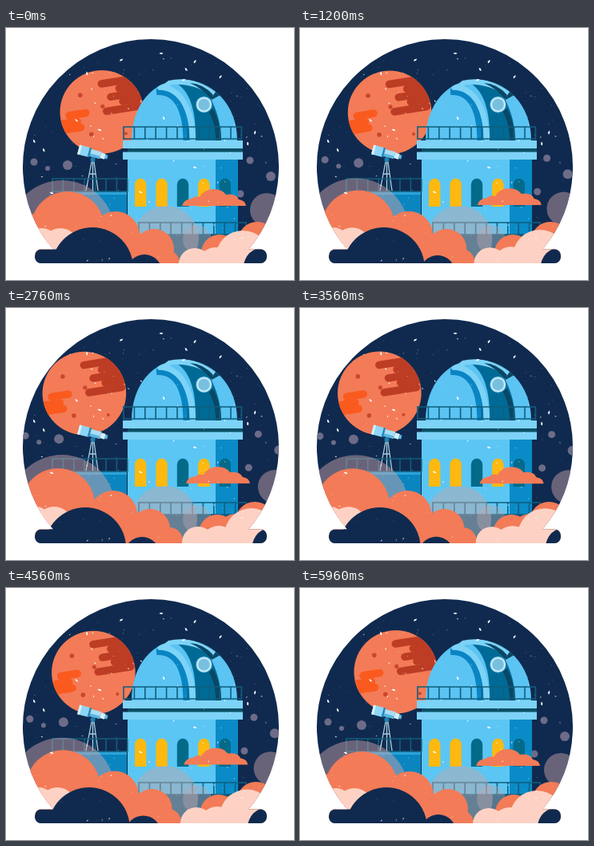
Write an HTML page that moves like this. It is 360x316 px and loops after 6000 ms.

```html
<!DOCTYPE html>
<html lang="en">
<head>
<meta charset="utf-8">
<title>Observatory</title>
<style>
html, body { margin: 0; width: 100%; height: 100%; overflow: hidden; background: #fff; }
svg { display: block; width: 360px; height: 316px; }
</style>
</head>
<body>
<svg id="scene" viewBox="0 0 360 316">
  <defs>
    <clipPath id="globe">
      <path d="M76.3 295A160 160 0 1 1 285.7 295Z"/>
      <rect x="36" y="277.5" width="290" height="17.5" rx="8"/>
    </clipPath>
    <clipPath id="disc"><circle r="52.3"/></clipPath>
    <clipPath id="domeClip"><path d="M157 141C157 96 184 65 221 65S289 96 289 141Z"/></clipPath>
  </defs>
  <g clip-path="url(#globe)">
    <rect width="360" height="316" fill="#102a4f"/>
    <g id="dots"></g>
    <g id="planet">
      <g clip-path="url(#disc)">
        <circle r="53" fill="#f37b57"/>
        <g id="bands" stroke-width="9.5" stroke-linecap="round" fill="none"></g>
        <g fill="#c9472e">
          <circle cx="-27" cy="-21" r="2.8"/><circle cx="1" cy="-7" r="2.6"/>
          <circle cx="-13" cy="28" r="2.8"/><circle cx="30" cy="27" r="2"/>
        </g>
      </g>
    </g>

    <rect x="72" y="205" width="79" height="60" fill="#0a85bf"/>
    <rect x="72" y="205" width="79" height="4" fill="#2ba3d8"/>
    <g id="scope" stroke-linecap="round">
      <path d="M107 168L100 204M108.5 168V204M110 168L115 204M104 183H112" stroke="#a9cfe2" stroke-width="1.3" fill="none"/>
      <g transform="translate(108 157) rotate(15)">
        <rect x="-18" y="-6" width="14" height="12" rx="1" fill="#8fd6f6"/>
        <rect x="-18" y="-6" width="3" height="12" fill="#d8f1fb"/>
        <rect x="-5" y="-6" width="2.5" height="12" fill="#2088bd"/>
        <rect x="-2.5" y="-4.5" width="13" height="9" fill="#a9def6"/>
        <rect x="-2.5" y="1" width="13" height="3.5" fill="#58b4df"/>
        <rect x="10.5" y="-3.5" width="6" height="7" fill="#d3effb"/>
        <rect x="16.5" y="-2.5" width="3" height="5" fill="#5db9e5"/>
      </g>
      <circle cx="108.5" cy="165" r="3" fill="#1a82b5"/>
    </g>

    <g clip-path="url(#domeClip)">
      <rect x="150" y="60" width="150" height="82" fill="#5bc4f3"/>
      <path d="M206 66C230 74 238 104 237 141H269C269 112 258 84 236 64Z" fill="#006a96"/>
      <path d="M230 65C243 72 252 80 257 90L268 84L240 60Z" fill="#0a4764"/>
      <path d="M259 101C264 112 269 126 269 141H262C262 126 259 114 253 104Z" fill="#0a4764"/>
      <path d="M188 80C216 78 225 107 225.5 141" fill="none" stroke="#0a85c3" stroke-width="8"/>
      <path d="M190 74C221 74 233 106 233.5 141" fill="none" stroke="#7dd3f7" stroke-width="7"/>
    </g>
    <path d="M189 77L203 66Q234 59 262 80L258 86Q236 69 208 71L196 78Z" fill="#7dd3f7"/>
    <path d="M230 69Q247 70 259 84L256 89Q246 76 230 69Z" fill="#0a4764"/>
    <circle cx="247.5" cy="96" r="11" fill="#1278a6"/>
    <circle cx="247.5" cy="96" r="8.5" fill="#78bfdf" stroke="#bfe9fa" stroke-width="2.5"/>

    <rect x="152" y="160" width="138" height="100" fill="#5bc6f4"/>
    <rect x="262" y="160" width="28" height="100" fill="#0a8bc7"/>
    <rect x="146" y="141" width="150" height="10" fill="#7dd3f7"/>
    <rect x="152" y="151" width="144" height="5" fill="#0b4f66"/>
    <rect x="146" y="155.5" width="150" height="9.5" fill="#7dd3f7"/>
    <g id="windows"></g>
    <rect x="152" y="259" width="138" height="40" fill="#0f5478"/>
    <g id="rails" fill="none" stroke="#0f5f7f" stroke-width="1.6"></g>
    <g id="clouds"></g>
  </g>
  <g id="specks" fill="#fff"></g>
</svg>
<script>
const LOOP = 6000, STEP = 40;
const $ = id => document.getElementById(id);
const movers = [];

function add(parent, tag, attrs) {
  const el = document.createElementNS('http://www.w3.org/2000/svg', tag);
  for (const key in attrs) el.setAttribute(key, attrs[key]);
  parent.appendChild(el);
  return el;
}

function drift(el, dx, dy, x = 0, y = 0) {
  movers.push({ el, dx, dy, x, y });
}

function group(fill, dx, dy, opacity = 1) {
  const g = add($('clouds'), 'g', { fill, opacity });
  drift(g, dx, dy);
  return g;
}

function puffs(g, list) {
  for (const [cx, cy, r] of list) add(g, 'circle', { cx, cy, r });
}

function rail(x1, x2, y1, y2, gap) {
  let d = `M${x1} ${y1}H${x2}M${x1} ${y2}H${x2}`;
  for (let x = x1 + 1; x <= x2; x += gap) d += `M${x} ${y1}V${y2}`;
  add($('rails'), 'path', { d });
}

// Planet stripes: start, end, height and colour.
for (const [x1, x2, y, stroke] of [
  [5, 39, -35, '#bd3c24'], [26, 60, -26, '#bd3c24'],
  [14, 50, -17, '#bd3c24'], [28, 60, -9, '#bd3c24'], [6, 47, 0, '#bd3c24'],
  [-41, -20, -2, '#fa5a1e'], [-60, -32, 7, '#fa5a1e'], [-60, -29, 15, '#fa5a1e']
]) add($('bands'), 'path', { d: `M${x1} ${y}H${x2}`, stroke });
$('bands').setAttribute('transform', 'rotate(-9)');
drift($('planet'), -22.3, 1.7, 119.8, 105.3);

for (const [cx, cy, r] of [
  [77, 172, 6], [35, 168, 4.5], [52, 176, 3],
  [305, 166, 4.5], [331, 186, 6], [293, 208, 4.5]
]) {
  const dot = add($('dots'), 'circle', { cx, cy, r, fill: '#6d6c88' });
  drift(dot, cx < 180 ? -11 : 10.5, -8);
}

['#fdb90f', '#fdb90f', '#036a8a', '#fdb90f', '#036a8a'].forEach((fill, i) => {
  const x = 161 + i * 26.4;
  add($('windows'), 'path', { d: `M${x} 224V196a7.2 7.2 0 0 1 14.4 0V224Z`, fill });
});

rail(146, 295, 124, 139, 13.4);
rail(57, 152, 189, 205, 13.4);
rail(165, 301, 244, 259, 13.4);

puffs(group('#d5a9ae', 0, -7, .45), [[70, 257, 66]]);
puffs(group('#bba9b0', -2, 0, .5), [[200, 264, 41]]);
puffs(group('#bba9b0', 0, 0, .4), [[239, 265, 18]]);
puffs(group('#d5a9ae', 10, -4, .45), [[326, 228, 21]]);

const wisp = group('#f37b57', 5, -3);
add(wisp, 'path', {
  d: 'M220 223Q222 215 232 214Q236 210 242 212Q248 202 259 202Q270 202 275 209Q287 207 291 215Q299 216 300 223Z'
});

puffs(group('#f37b57', -3, 0), [[314, 267, 24], [267, 282, 23], [290, 278, 20]]);

puffs(group('#f37b57', -12, -4), [[77, 251, 46], [36, 258, 25]]);
puffs(group('#f37b57', -3, -1), [[137, 260, 30], [150, 282, 30]]);
puffs(group('#f37b57', -5, 0), [[185, 277, 25]]);
puffs(group('#f37b57', 4, -3), [[200, 295, 17]]);

const paleRight = group('#fdd2c4', 4, -2);
puffs(paleRight, [[236, 296, 20], [262, 297, 22]]);
add(paleRight, 'rect', { x: 235, y: 289, width: 100, height: 20 });
puffs(group('#fdd2c4', 11, -3), [[296, 288, 34]]);

puffs(group('#fdd2c4', -8, -2), [[68, 274, 23], [45, 270, 19]]);
add($('clouds'), 'rect', { x: 36, y: 277.5, width: 60, height: 18, rx: 8, fill: '#102a4f' });
puffs(group('#102a4f', -9, 0), [[108, 301, 51]]);
puffs(group('#102a4f', -3, 3), [[173, 306, 22]]);
puffs(group('#102a4f', 11, 0), [[322, 300, 25]]);

// Worn-print flecks, fixed over the whole picture.
let seed = 29;
const rand = () => (seed = (seed * 16807) % 2147483647) / 2147483647;

function fleck(x, y, s) {
  const a = rand() * 180;
  add($('specks'), 'path', {
    d: `M${-s} 0L${-s * .2} ${-s * .5}L${s} ${-s * .2}L${s * .3} ${s * .4}Z`,
    transform: `translate(${x} ${y}) rotate(${a})`
  });
}

for (const [x, y] of [
  [194, 32], [144, 40], [222, 65], [225, 52], [101, 57], [35, 142], [47, 153],
  [236, 42], [268, 61], [236, 175], [168, 206], [117, 128], [57, 207], [332, 89],
  [311, 131], [197, 113], [302, 145], [88, 116]
]) fleck(x, y, 2.6);

for (let i = 0; i < 190; i++) {
  const a = rand() * Math.PI * 2, r = Math.sqrt(rand()) * 156;
  const x = 181 + r * Math.cos(a), y = 174 + r * Math.sin(a);
  const s = .4 + rand() ** 3 * 1.2;
  if (y < 292) fleck(x, y, s);
}

function draw(time) {
  const t = Math.floor((time % LOOP) / STEP) * STEP;
  const k = (1 - Math.cos(2 * Math.PI * t / LOOP)) / 2;
  for (const m of movers) {
    m.el.setAttribute('transform', `translate(${m.x + m.dx * k} ${m.y + m.dy * k})`);
  }
}

const start = performance.now();
function tick() {
  draw(performance.now() - start);
  requestAnimationFrame(tick);
}
tick();
</script>
</body>
</html>
```
